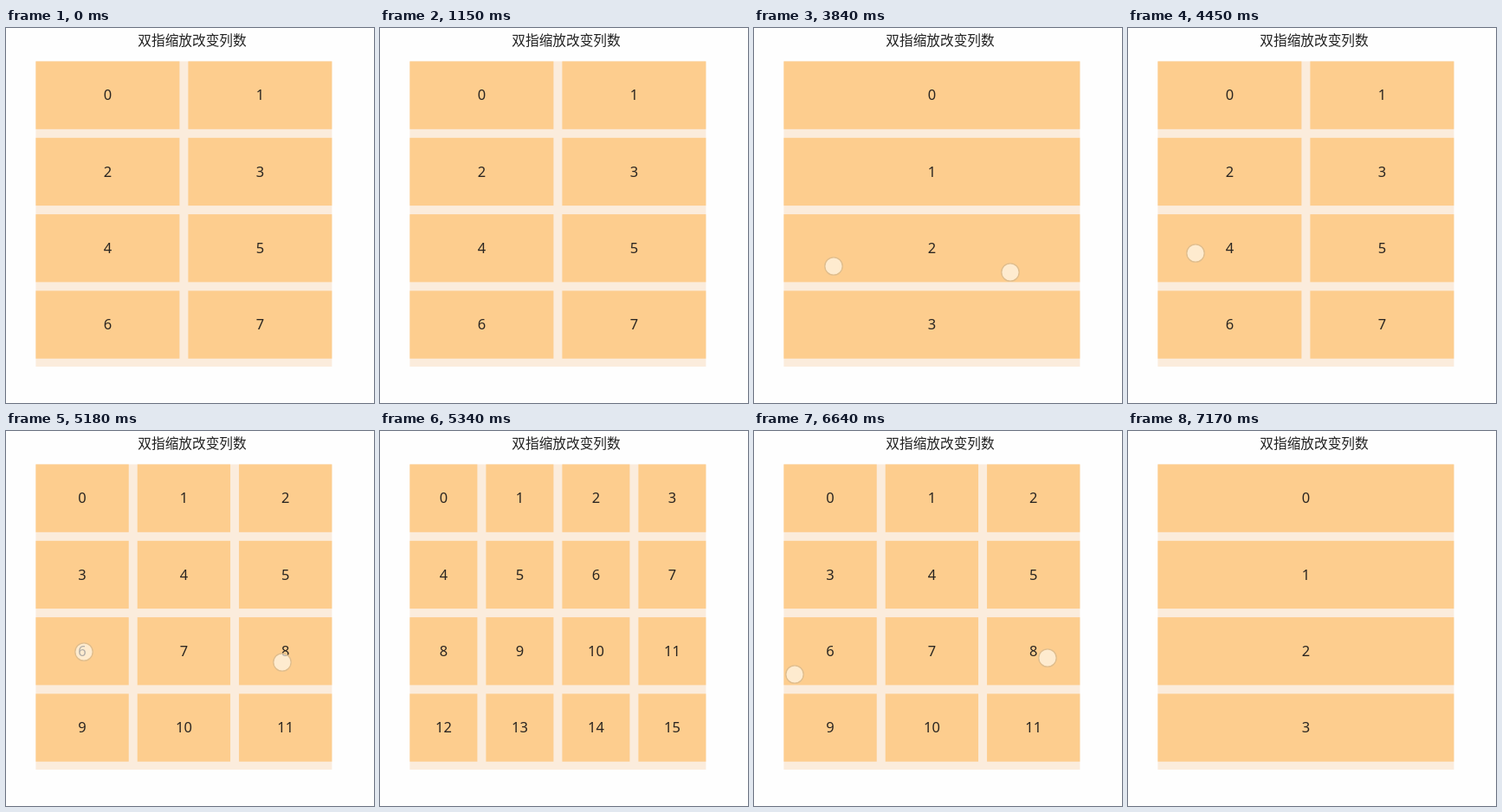
Write an HTML page with a canvas that moves like this. It is 425x433 px and loops after 8000 ms.

```html
<!DOCTYPE html>
<html lang="zh-CN">
<head>
<meta charset="utf-8">
<title>双指缩放改变列数</title>
<style>
  html, body { margin: 0; width: 100%; height: 100%; overflow: hidden; background: #fefefe; }
  canvas { display: block; width: 425px; height: 433px; }
</style>
</head>
<body>
<canvas id="stage"></canvas>
<script>
const W = 425, H = 433, LOOP = 8000, STEP = 40;
const GRID = { x: 34.4, y: 38.5, w: 342, h: 352.5, gap: 10, cellH: 78.3, rows: 4 };

const canvas = document.getElementById('stage');
const ctx = canvas.getContext('2d');
const dpr = window.devicePixelRatio || 1;
canvas.width = W * dpr;
canvas.height = H * dpr;
ctx.scale(dpr, dpr);

// Each finger: [x0, y0, x1, y1]; on/off shift its touch and lift within the pinch.
const pinches = [
  { start: 2410, end: 2610, cols: 1,
    left: [143, 279, 82, 275], right: [261, 279, 324, 280] },
  { start: 3840, end: 4040, cols: 2, hold: 40,
    left: [92, 275, 146, 278], right: [296, 282, 250, 276] },
  { start: 4450, end: 4690, cols: 3, rightOn: 40,
    left: [78, 260, 148, 264], right: [324, 266, 252, 266] },
  { start: 5180, end: 5340, cols: 4,
    left: [90, 255, 148, 260], right: [319, 267, 252, 265] },
  { start: 5870, end: 6070, cols: 3, early: 40, rightOff: 40,
    left: [145, 272, 48, 282], right: [262, 268, 335, 262] },
  { start: 6520, end: 6680, cols: 2,
    left: [140, 274, 47, 281], right: [262, 268, 339, 262] },
  { start: 7050, end: 7170, cols: 1,
    left: [132, 274, 52, 281], right: [272, 268, 361, 262] }
];

const ease = p => p * p * (3 - 2 * p);
const mix = (a, b, p) => a + (b - a) * p;

function columnsAt(t) {
  return pinches.reduce((n, p) => t >= p.end - (p.early || 0) ? p.cols : n, 2);
}

function drawGrid(cols) {
  const { x, y, w, h, gap, cellH, rows } = GRID;
  const cellW = (w - gap * (cols - 1)) / cols;
  ctx.fillStyle = '#fbecdc';
  ctx.fillRect(x, y, w, h);
  ctx.font = '16.5px "Noto Sans", sans-serif';
  for (let i = 0; i < cols * rows; i++) {
    const cx = x + (i % cols) * (cellW + gap);
    const cy = y + Math.floor(i / cols) * (cellH + gap);
    ctx.fillStyle = '#fdcd8e';
    ctx.fillRect(cx, cy, cellW, cellH);
    ctx.fillStyle = '#292521';
    ctx.fillText(i, cx + cellW / 2, cy + cellH / 2 + 5.8);
  }
}

function drawFinger([x0, y0, x1, y1], p) {
  ctx.beginPath();
  ctx.arc(mix(x0, x1, p), mix(y0, y1, p), 10.2, 0, Math.PI * 2);
  ctx.fillStyle = 'rgba(255, 252, 246, 0.63)';
  ctx.fill();
  ctx.strokeStyle = '#dfbd8d';
  ctx.lineWidth = 1.3;
  ctx.stroke();
}

function drawPinch(p, t) {
  const { start, end, hold = 0, rightOn = 0, rightOff = 0 } = p;
  if (t < start || t >= end) return;
  const stepped = Math.floor((t - start) / STEP) * STEP;
  const span = end - start - STEP - hold;
  const k = ease(Math.min(1, Math.max(0, (stepped - hold) / span)));
  drawFinger(p.left, k);
  if (t >= start + rightOn && t < end - rightOff) drawFinger(p.right, k);
}

function draw(t) {
  ctx.fillStyle = '#fefefe';
  ctx.fillRect(0, 0, W, H);
  ctx.textAlign = 'center';
  ctx.textBaseline = 'alphabetic';
  ctx.fillStyle = '#222';
  ctx.font = '15.7px "Noto Sans CJK SC", "Noto Sans CJK", sans-serif';
  ctx.fillText('双指缩放改变列数', 215, 20);
  drawGrid(columnsAt(t));
  pinches.forEach(p => drawPinch(p, t));
}

const origin = performance.now();
function frame() {
  draw((performance.now() - origin) % LOOP);
  requestAnimationFrame(frame);
}
frame();
</script>
</body>
</html>
```
